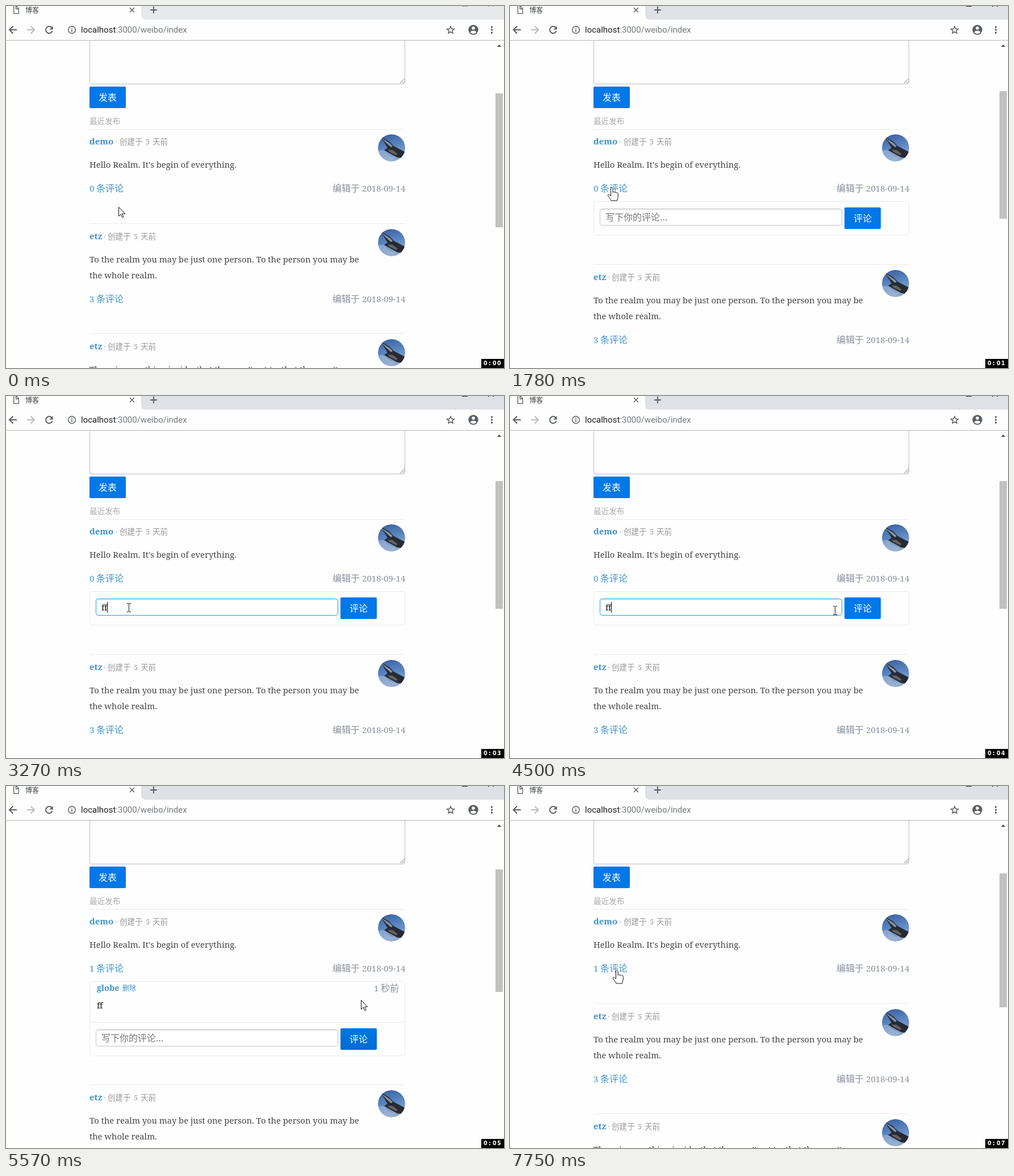
An HTML page that plays this animation: 877 px wide and 638 px high, repeating every 8000 ms.

```html
<!DOCTYPE html>
<html lang="zh-CN">
<head>
<meta charset="utf-8">
<title>博客</title>
<style>
html, body { margin: 0; width: 100%; height: 100%; overflow: hidden; background: #fefefe; }
svg { display: block; width: 877px; height: 638px; }

text { font: 16px 'Noto Sans CJK SC', 'Noto Sans CJK', sans-serif; white-space: pre; }
.url { font: 15px Roboto, sans-serif; fill: #74787c; }
.serif { font: 14.8px 'Noto Serif', serif; fill: #444; }
.user { font: bold 15px 'Noto Serif', serif; fill: #3d92c9; }
.small { font-size: 13.6px; fill: #999; }
.num { font: 15px 'Noto Serif', serif; }
.small.num { font-size: 13px; }
.link { fill: #3d92c9; }
.date { fill: #8a909c; }
.label { fill: #fff; }
.timer { font: bold 9.6px 'DejaVu Sans', sans-serif; fill: #fff; }
.rule { stroke: #eaeaea; }
.icon { fill: none; stroke: #5a5e63; stroke-width: 2; }
.box { fill: none; stroke: #ebebeb; }

/* One 8 s loop, hard steps throughout */
.a { animation: var(--k) 8s step-end infinite; }
.strip { --k: strip; }
.keys { --k: keys; }
.thumb { --k: thumb; }
.feed { --k: feed; }
.panel { --k: panel; }
.reply { --k: reply; }
.zero { --k: zero; }
.one { --k: one; }
.frame { --k: frame; }
.form { --k: form; }
.field { --k: field; }
.hint { --k: hint; }
.key1 { --k: key1; }
.key2 { --k: key2; }
.caret { --k: caret; }
.shade { --k: shade; }
.press { --k: press; }
.tick { --k: tick; }
.pointer { --k: pointer; }
.arrow { --k: arrow; }
.hand { --k: hand; }
.beam { --k: beam; }

@keyframes strip { 0% { fill: #e7eaed } 15.375%, to { fill: #dee1e6 } }
@keyframes keys { 0% { stroke: #999 } 15.375%, to { stroke: #111 } }
@keyframes thumb {
  0%, 95.375%, to { y: 154px; height: 236px }
  22.25% { y: 150px; height: 225px }
  69.625% { y: 147px; height: 216px }
}
@keyframes feed {
  0%, 95.375%, to { transform: none }
  22.25% { transform: translateY(72px) }
  69.625% { transform: translateY(143px) }
}
@keyframes panel { 0%, 95.375%, to { opacity: 0 } 22.25% { opacity: 1 } }
@keyframes reply { 0%, 95.375%, to { opacity: 0 } 69.625% { opacity: 1 } }
@keyframes zero { 0% { opacity: 1 } 69.625%, to { opacity: 0 } }
@keyframes one { 0% { opacity: 0 } 69.625%, to { opacity: 1 } }
@keyframes frame { 0% { height: 59px } 69.625%, to { height: 131px } }
@keyframes form { 0% { transform: none } 69.625%, to { transform: translateY(72px) } }
@keyframes field { 0%, 61.875%, to { stroke: #c4c4c4 } 32.75% { stroke: #129fea } }
@keyframes hint { 0%, 69.625%, to { opacity: 1 } 36.125% { opacity: 0 } }
@keyframes key1 { 0%, 69.625%, to { opacity: 0 } 36.125% { opacity: 1 } }
@keyframes key2 { 0%, 69.625%, to { opacity: 0 } 39.375% { opacity: 1 } }
@keyframes caret {
  0%, 46.25%, 59.25%, to { opacity: 0; transform: none }
  32.75% { opacity: 1; transform: translateX(-10px) }
  36.125% { opacity: 1; transform: translateX(-5px) }
  39.375%, 53.125% { opacity: 1; transform: none }
}
@keyframes shade { 0% { opacity: 0 } 58.125%, to { opacity: 1 } }
@keyframes press { 0%, 65%, to { opacity: 0 } 63.75% { opacity: 1 } }
@keyframes tick {
  0% { transform: none }
  12% { transform: translateY(-20px) }
  25.75% { transform: translateY(-40px) }
  37.75% { transform: translateY(-60px) }
  50% { transform: translateY(-80px) }
  63.75% { transform: translateY(-100px) }
  78.625% { transform: translateY(-120px) }
  90.625%, to { transform: translateY(-140px) }
}
@keyframes pointer {
  0% { transform: translate(198px, 354px) }
  3.875% { transform: translate(196px, 350px) }
  5.5% { transform: translate(193px, 343px) }
  7.125% { transform: translate(189px, 336px) }
  8.75% { transform: translate(185px, 329px) }
  10.375% { transform: translate(181px, 323px) }
  12% { transform: translate(180px, 320px) }
  25.75% { transform: translate(184px, 328px) }
  27.5% { transform: translate(195px, 345px) }
  29.25% { transform: translate(207px, 361px) }
  31% { transform: translate(214px, 370px) }
  32.75% { transform: translate(216px, 373px) }
  50% { transform: translate(224px, 373px) }
  51.625% { transform: translate(290px, 374px) }
  53.125% { transform: translate(400px, 376px) }
  54.75% { transform: translate(505px, 377px) }
  56.25% { transform: translate(572px, 378px) }
  58.125% { transform: translate(606px, 379px) }
  60% { transform: translate(622px, 378px) }
  61.875% { transform: translate(625px, 377px) }
  78.625% { transform: translate(600px, 374px) }
  80.25% { transform: translate(500px, 364px) }
  81.875% { transform: translate(370px, 351px) }
  83.625% { transform: translate(250px, 340px) }
  85.25% { transform: translate(201px, 335px) }
  90.625% { transform: translate(194px, 329px) }
  91.875%, to { transform: translate(189px, 325px) }
}
@keyframes arrow {
  0%, 27.5%, 69.625% { opacity: 1 }
  8.75%, 29.25%, 90.625%, to { opacity: 0 }
}
@keyframes hand {
  0%, 27.5%, 69.625% { opacity: 0 }
  8.75%, 58.125%, 90.625%, to { opacity: 1 }
}
@keyframes beam { 0%, 58.125%, to { opacity: 0 } 29.25% { opacity: 1 } }
</style>
</head>
<body>
<svg viewBox="0 0 877 638">
  <defs>
    <linearGradient id="sky" x1="0" y1="0" x2=".3" y2="1">
      <stop offset="0" stop-color="#345c9c"/>
      <stop offset=".55" stop-color="#5c86c2"/>
      <stop offset="1" stop-color="#8fa9cc"/>
    </linearGradient>
    <linearGradient id="dim" x1="0" y1="0" x2="0" y2="1">
      <stop offset="0" stop-opacity="0"/>
      <stop offset=".4" stop-opacity=".05"/>
      <stop offset="1" stop-opacity=".1"/>
    </linearGradient>
    <clipPath id="round"><circle r="24"/></clipPath>
    <clipPath id="clock"><path d="M837 622h40v16h-40z"/></clipPath>

    <g id="avatar" transform="translate(679 250)" clip-path="url(#round)">
      <circle r="24" fill="url(#sky)"/>
      <path d="M-24 6q10-5 16 3t14 7l-4 9h-26z" fill="#a3b8d4" opacity=".6"/>
      <path d="M-19-20L-4-11 4-3 25 8V19L10 17-6 8-13 4-7 0-12-8z" fill="#252a33"/>
      <path d="M-18-18L-3-8l5 5-3 2-9-8z" fill="#8b95a5"/>
      <path d="M-7 3l9 1 9 7-3 2-12-6z" fill="#67625f"/>
    </g>
    <g id="made">
      <text class="small num">·</text>
      <text class="small" x="7">创建于</text>
      <text class="small num" x="53">5</text>
      <text class="small" x="65">天前</text>
    </g>
    <g id="foot">
      <text class="link" x="159" y="327">条评论</text>
      <text class="date" x="575" y="327">编辑于</text>
      <text class="date num" x="627" y="327">2018-09-14</text>
    </g>
    <g id="head">
      <path class="rule" d="M147 216.5h556"/>
      <text class="user" x="147" y="244">etz</text>
      <use href="#made" x="172" y="244"/>
      <use href="#avatar"/>
    </g>
  </defs>

  <path fill="#fefefe" d="M0 0h877v638H0z"/>

  <!-- Browser -->
  <path class="a strip" d="M238 0v16q0 8 8 8h631V0z"/>
  <path class="a keys" d="M803 .5h10M849 .5h2M857 .5h2"/>
  <path class="icon" style="stroke-width:1.3" d="M13.7 0v13.3h8.6V4.5L18 0M17.5 0v5h5"/>
  <text x="34" y="12" style="font-size:12px" fill="#3c4043">博客</text>
  <path class="icon" style="stroke-width:1.5" d="M218 3l8 8m0-8l-8 8"/>
  <path class="icon" d="M260 1v12M254 7h12"/>
  <path class="icon" d="M19 42H6M12.5 35.5L6 42l6.5 6.5"/>
  <path class="icon" style="stroke:#b9bbbe" d="M37 42h13M43.5 35.5L50 42l-6.5 6.5"/>
  <path class="icon" d="M80.5 38A6 6 0 1 0 81.7 44"/>
  <path fill="#5a5e63" d="M82.7 35.3v6.2h-6.2z"/>
  <circle class="icon" cx="116" cy="42" r="6.3" style="stroke-width:1.5"/>
  <path class="icon" style="stroke-width:1.6" d="M116 41v4.5M116 38.2v1.6"/>
  <text class="url" x="132" y="47"><tspan fill="#202124">localhost</tspan>:3000/weibo/index</text>
  <path class="icon" style="stroke-width:1.5" d="M783 36l1.8 4.2 4.5.4-3.4 3 1 4.4-3.9-2.4-3.9 2.4 1-4.4-3.4-3 4.5-.4z"/>
  <circle cx="823" cy="42" r="8.7" fill="#5a5e63"/>
  <circle cx="823" cy="39" r="2.8" fill="#fff"/>
  <path fill="#fff" d="M817.5 46.2q1.5-2.7 5.5-2.7t5.5 2.7q-2 2.8-5.5 2.8t-5.5-2.8z"/>
  <path stroke="#5a5e63" stroke-width="3.4" stroke-linecap="round" d="M855.5 37h0M855.5 42h0M855.5 47h0"/>
  <path stroke="#b8b8b8" d="M0 60.5h877"/>
  <path fill="#505050" d="M864.5 72l4-4 4 4z"/>
  <rect class="a thumb" x="862" y="154" width="13" height="236" fill="#c1c1c1"/>

  <!-- Composer -->
  <path fill="none" stroke="#bdbdbd" d="M147.5 61v73q0 3.5 3.5 3.5H699q3.5 0 3.5-3.5V61"/>
  <path stroke="#777" d="M694 136l8-8M698 136l4-4"/>
  <rect x="147" y="142" width="64" height="38" rx="2" fill="#0078e7"/>
  <text class="label" x="163" y="167">发表</text>
  <text class="small" x="147" y="208" style="fill:#aaa">最近发布</text>
  <path class="rule" d="M147 217.5h556"/>

  <!-- First post -->
  <text class="user" x="147" y="244">demo</text>
  <use href="#made" x="193" y="244"/>
  <use href="#avatar"/>
  <text class="serif" x="147" y="285">Hello Realm. It's begin of everything.</text>
  <text class="a zero link num" x="147" y="327">0</text>
  <text class="a one link num" x="147" y="327">1</text>
  <use href="#foot"/>

  <!-- Comments -->
  <g class="a panel">
    <rect class="a frame box" x="147.5" y="344.5" width="555" height="59" rx="3"/>
    <g class="a reply">
      <text class="user" x="160" y="361" style="font-size:14.4px">globe</text>
      <text class="link" x="205" y="361" style="font-size:12px">删除</text>
      <text class="date num" x="648" y="362">1</text>
      <text class="date" x="660" y="362">秒前</text>
      <text class="serif" x="160" y="392" style="fill:#111">ff</text>
      <path class="rule" d="M148 416.5h554"/>
    </g>
    <g class="a form">
      <rect class="a field" x="158.5" y="357.5" width="426" height="29" rx="4" fill="#fff"/>
      <path stroke="#e6e6e6" d="M161 358.5h421"/>
      <text class="a hint" x="168" y="378" fill="#757575">写下你的评论...</text>
      <text class="a key1 serif" x="168" y="378" style="fill:#111">f</text>
      <text class="a key2 serif" x="173" y="378" style="fill:#111">f</text>
      <path class="a caret" stroke="#000" d="M178.5 363v19"/>
      <rect x="589" y="355" width="64" height="38" rx="2" fill="#0078e7"/>
      <rect class="a shade" x="589" y="355" width="64" height="38" rx="2" fill="url(#dim)"/>
      <rect class="a press" x="590" y="356" width="62" height="36" rx="2" fill="none" stroke="#000" stroke-opacity=".2" stroke-width="2"/>
      <text class="label" x="605" y="380">评论</text>
    </g>
  </g>

  <!-- Later posts -->
  <g class="a feed">
    <g transform="translate(0 167)">
      <use href="#head"/>
      <text class="serif" x="147" y="285">To the realm you may be just one person. To the person you may be</text>
      <text class="serif" x="147" y="313">the whole realm.</text>
      <text class="link num" x="147" y="355">3</text>
      <use href="#foot" y="28"/>
    </g>
    <g transform="translate(0 361)">
      <use href="#head"/>
      <text class="serif" x="147" y="285">There is something inside, that they can't get to, that they can't</text>
    </g>
  </g>

  <!-- Clock -->
  <g clip-path="url(#clock)">
    <path d="M837 622h40v16h-40z"/>
    <text class="timer" x="841 850 857" y="633">0:0</text>
    <g class="a tick">
      <text class="timer" x="865" y="633">0</text>
      <text class="timer" x="865" y="653">1</text>
      <text class="timer" x="865" y="673">2</text>
      <text class="timer" x="865" y="693">3</text>
      <text class="timer" x="865" y="713">4</text>
      <text class="timer" x="865" y="733">5</text>
      <text class="timer" x="865" y="753">6</text>
      <text class="timer" x="865" y="773">7</text>
    </g>
  </g>

  <!-- Pointer -->
  <g class="a pointer" fill="#fff" stroke="#111">
    <path class="a arrow" d="M.5.5v16l3.7-3.5 2.6 5.7 2.3-1-2.5-5.6h5z"/>
    <path class="a hand" d="M-2.5 15V1.8a1.8 1.8 0 0 1 3.6 0V8.5c.6-1.4 3-1.2 3.4.3 .6-1 2.8-.8 3.2.6 .8-.9 2.6-.4 2.6 1.2V16c0 2.5-1.5 3.5-1.8 7H-2c-.4-2.5-4.6-6.5-5.5-9-.4-1.8 1.6-2.6 2.8-1.2z"/>
    <path class="a beam" fill="none" d="M-3-7.5h3M1-7.5h3M.5-7V7M-3 7.5h3M1 7.5h3"/>
  </g>
</svg>
</body>
</html>
```
